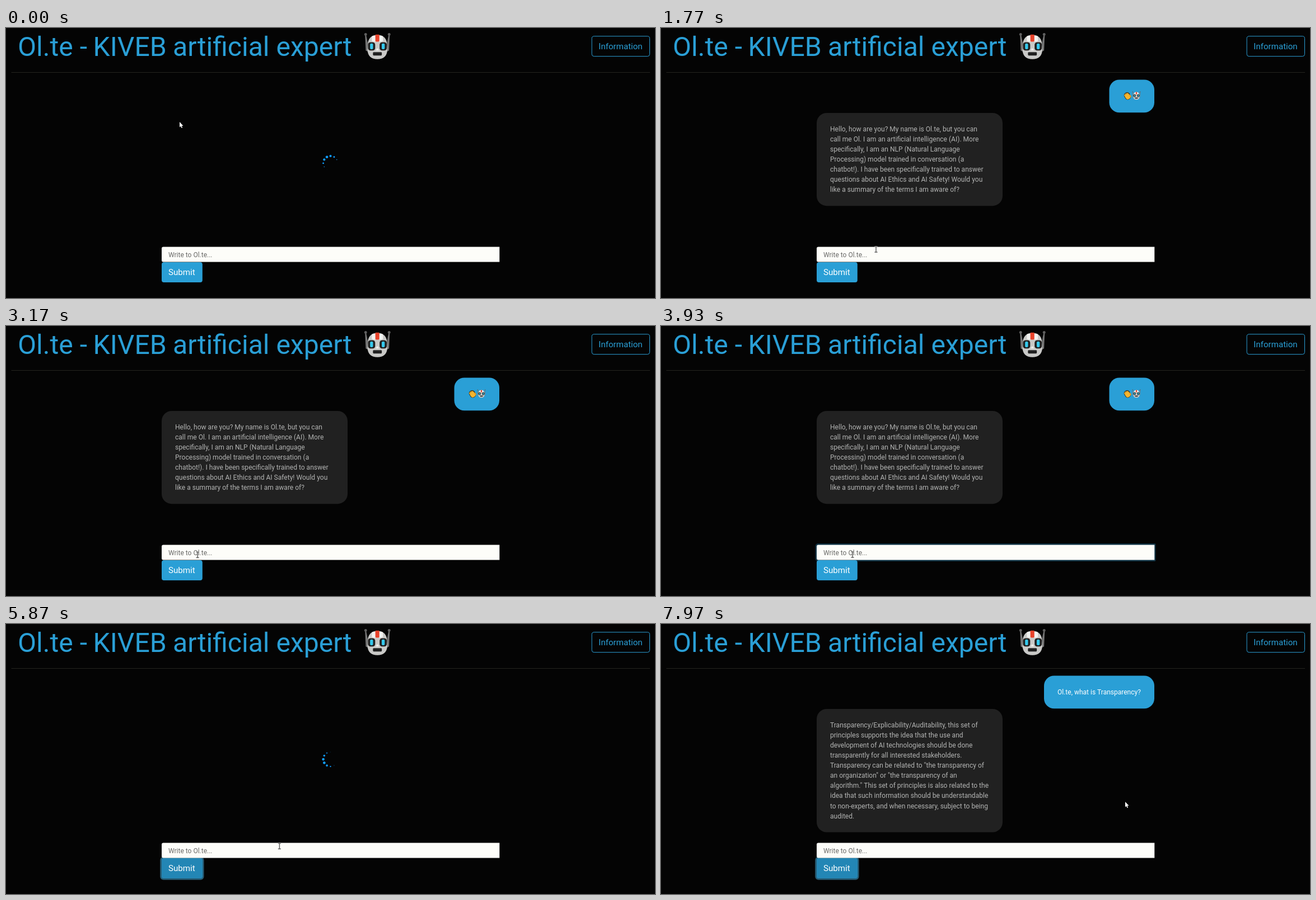
These frames come from a looping animation (1159x483 px, 8000 ms). An HTML page with a canvas:

```html
<!DOCTYPE html>
<html lang="en">
<head>
<meta charset="utf-8">
<title>Chatbot</title>
<style>
html, body { margin: 0; width: 100%; height: 100%; overflow: hidden; background: #040404; }
canvas { display: block; width: 1159px; height: 483px; }
</style>
</head>
<body>
<canvas id="stage"></canvas>
<script>
const W = 1159, H = 483, LOOP = 8000;
const BG = '#040404', BLUE = '#2a9fd6', GREY = '#212121';
const NAME = 'Ol.te';
const QUESTION = NAME + ', what is Transparency?';
const GREETING = [
  `Hello, how are you? My name is ${NAME}, but you can`,
  'call me Ol. I am an artificial intelligence (AI). More',
  'specifically, I am an NLP (Natural Language',
  'Processing) model trained in conversation (a',
  'chatbot!). I have been specifically trained to answer',
  'questions about AI Ethics and AI Safety! Would you',
  'like a summary of the terms I am aware of?'
];
const ANSWER = [
  'Transparency/Explicability/Auditability, this set of',
  'principles supports the idea that the use and',
  'development of AI technologies should be done',
  'transparently for all interested stakeholders.',
  'Transparency can be related to "the transparency of',
  'an organization" or "the transparency of an',
  'algorithm." This set of principles is also related to the',
  'idea that such information should be understandable',
  'to non-experts, and when necessary, subject to being',
  'audited.'
];

// Moments in ms
const GREET = 600, FOCUS = 3600, TYPE = 4100, TYPED = 4780;
const CLICK = 5380, LOAD = 5430, REPLY = 7400;

// Pointer stops: time, x, y
const PATH = [
  [0, 310, 168], [700, 318, 185], [1770, 384, 396], [2170, 340, 438],
  [2440, 338, 438], [2570, 345, 418], [3250, 342, 409], [4780, 342, 409],
  [5120, 322, 436], [5480, 322, 436], [6500, 829, 318], [LOOP, 829, 318]
];

const canvas = document.getElementById('stage');
const c = canvas.getContext('2d');
const dpr = window.devicePixelRatio || 1;
canvas.width = W * dpr;
canvas.height = H * dpr;

const clamp = v => Math.max(0, Math.min(1, v));
const smooth = p => p * p * (3 - 2 * p);
const ramp = (t, start, length) => clamp((t - start) / length);

function box(x, y, w, h, r, fill) {
  c.beginPath();
  c.roundRect(x, y, w, h, r);
  c.fillStyle = fill;
  c.fill();
}

function dot(x, y, r, fill) {
  c.beginPath();
  c.arc(x, y, r, 0, Math.PI * 2);
  c.fillStyle = fill;
  c.fill();
}

function poly(points, fill, stroke, width = 1) {
  c.beginPath();
  for (let i = 0; i < points.length; i += 2) c.lineTo(points[i], points[i + 1]);
  c.closePath();
  c.lineWidth = width;
  c.lineJoin = 'round';
  c.strokeStyle = stroke || fill;
  if (stroke) c.stroke();
  c.fillStyle = fill;
  c.fill();
}

function text(s, x, y, size, fill) {
  c.font = `${size}px Roboto, sans-serif`;
  c.fillStyle = fill;
  c.fillText(s, x, y);
}

// Robot face on a 48 unit square
function robot(x, y, size) {
  c.save();
  c.translate(x, y);
  c.scale(size / 48, size / 48);
  for (const side of [0, 1]) {
    c.save();
    if (side) { c.translate(48, 0); c.scale(-1, 1); }
    poly([1.8, 4, 3.8, 4, 6.5, 18, 7, 34, 3, 32], '#757575');
    dot(2.8, 2.8, 2.5, '#606060');
    c.restore();
  }
  c.beginPath();
  c.moveTo(7, 17);
  c.bezierCurveTo(9, 8, 15, 4, 24, 3.5);
  c.bezierCurveTo(33, 4, 39, 8, 41, 17);
  c.lineTo(42, 31);
  c.bezierCurveTo(41, 42, 35, 47.5, 24, 47.5);
  c.bezierCurveTo(13, 47.5, 7, 42, 6, 31);
  c.closePath();
  c.fillStyle = '#c9c9c7';
  c.fill();
  box(14, 5, 20, 11, 3, '#f2f2f0');
  box(20.3, 3, 7.2, 13, 1.5, '#e8432b');
  for (const left of [7, 28]) {
    box(left, 17, 13, 15, 4.5, '#202020');
    box(left + 3.8, 19.3, 5.4, 10.2, 2, '#35c9ee');
  }
  poly([23, 28, 25, 28, 27, 32, 21, 32], '#eeeeec');
  box(16, 35, 16, 6, 1.5, '#202020');
  c.restore();
}

function wavingHand(x, y) {
  c.save();
  c.translate(x, y);
  c.rotate(-0.55);
  box(-5.4, -6.5, 10.6, 13.2, 4.5, '#2c2112');
  box(-4.5, -3, 8.8, 9, 3.5, '#f5b62f');
  for (let i = 0; i < 4; i++) box(-4.5 + i * 2.1, -6 + Math.abs(i - 1.5) * 0.8, 1.9, 7, 0.9, '#f5b62f');
  box(3.2, 0, 2.3, 5, 1, '#e69a20');
  c.restore();
}

function bubble(lines) {
  box(278, 152, 332, 39.4 + lines.length * 18.12, 18, GREY);
  lines.forEach((s, i) => text(s, 302, 184.6 + i * 18.12, 12.05, '#b3b4b3'));
}

function asked(x) {
  box(x, 92.5, 881 - x, 58.8, 18, BLUE);
}

// Twelve dots on a ring, each growing and shrinking in turn
function spinner(t, lead) {
  for (let i = 0; i < 12; i++) {
    const phase = ((((t + lead) / 1200 - i / 12) % 1) + 1) % 1;
    const size = smooth(clamp(1 - Math.abs(phase - 0.4) / 0.4));
    const a = i * Math.PI / 6;
    if (size > 0.01) dot(579.5 + 12.9 * Math.sin(a), 241.9 - 12.9 * Math.cos(a), 2.35 * size, '#119dff');
  }
}

function header() {
  text(NAME + ' -', 21, 49.6, 48.1, BLUE);
  text('KIVEB', 155.5, 49.6, 48.1, BLUE);
  text('artificial expert', 298.1, 49.6, 48.1, BLUE);
  robot(639.5, 8.7, 47.5);
  c.strokeStyle = BLUE;
  c.lineWidth = 1;
  c.beginPath();
  c.roundRect(1046.2, 14.7, 103.3, 36, 4);
  c.stroke();
  text('Information', 1058.3, 38, 15.1, BLUE);
  c.fillStyle = '#24241f';
  c.fillRect(9.5, 79, 1140.5, 1);
}

function form(t) {
  const ring = ramp(t, FOCUS, 150) * (1 - ramp(t, CLICK, 150));
  if (ring) {
    c.globalAlpha = ring;
    box(275.5, 389, 608, 32, [5, 2, 2, 5], '#0e3142');
    c.globalAlpha = 1;
  }
  const pressed = ramp(t, CLICK, 150);
  if (pressed) {
    c.globalAlpha = pressed;
    box(275.2, 416.4, 78.3, 41.3, 6, '#265c75');
    c.globalAlpha = 1;
  }
  box(278, 391.5, 603.3, 27, [3, 0, 0, 3], '#fdfdf9');
  const count = t < LOAD ? Math.ceil(QUESTION.length * ramp(t, TYPE, TYPED - TYPE)) : 0;
  if (count) text(QUESTION.slice(0, count), 290, 409.8, 12, '#2c2c2c');
  else text(`Write to ${NAME}...`, 290, 409.8, 12, '#6a6a68');

  const hover = Math.max(ramp(t, 2080, 150) * (1 - ramp(t, 2570, 150)), ramp(t, 4880, 150));
  box(278, 419, 72.8, 36, 4, BLUE);
  c.globalAlpha = hover;
  box(278, 419, 72.8, 36, 4, '#2386b5');
  c.globalAlpha = 1;
  text('Submit', 290, 441.8, 15.15, '#fff');
}

function pointerAt(t) {
  const i = Math.max(1, PATH.findIndex(p => p[0] > t));
  const [t0, x0, y0] = PATH[i - 1], [t1, x1, y1] = PATH[i];
  const p = smooth(clamp((t - t0) / (t1 - t0)));
  return [x0 + (x1 - x0) * p, y0 + (y1 - y0) * p];
}

function ibeam(x, y) {
  const trace = (color, width) => {
    c.strokeStyle = color;
    c.lineWidth = width;
    c.beginPath();
    c.moveTo(-2.5, -5); c.lineTo(2.5, -5);
    c.moveTo(0, -5); c.lineTo(0, 5);
    c.moveTo(-2.5, 5); c.lineTo(2.5, 5);
    c.stroke();
  };
  c.translate(x, y);
  trace('#c8c8c6', 2);
  trace('#4a4a4a', 1);
}

function pointer(t) {
  const [x, y] = pointerAt(t);
  const inside = x > 278 && x < 881;
  c.save();
  if (inside && y > 391 && y < 419) {
    ibeam(x, y);
  } else if (x > 278 && x < 351 && y >= 419 && y < 455) {
    c.translate(x, y);
    poly([-1, 0, 1, 0, 1.2, 4, 5.5, 5.2, 6, 8, 4.5, 13, -1, 13, -4, 8.5, -3, 7, -1, 8], '#fff', '#222', 1.6);
  } else {
    c.translate(x, y);
    poly([0, 0, 0, 9.5, 2.1, 7.7, 3.6, 11, 5.1, 10.3, 3.7, 7.1, 6.5, 7], '#fff', '#000', 1.4);
  }
  c.restore();
}

function draw(t) {
  c.setTransform(dpr, 0, 0, dpr, 0, 0);
  c.fillStyle = BG;
  c.fillRect(0, 0, W, H);
  header();
  if (t < GREET) {
    spinner(t, 380);
  } else if (t < LOAD) {
    asked(800.5);
    wavingHand(833, 121.5);
    robot(841.5, 113.5, 15);
    bubble(GREETING);
  } else if (t < REPLY) {
    spinner(t - 6830, 1080);
  } else {
    asked(684);
    text(QUESTION, 708, 126, 12, '#fff');
    bubble(ANSWER);
  }
  form(t);
  pointer(t);
}

const start = performance.now();
function tick() {
  draw((performance.now() - start) % LOOP);
  requestAnimationFrame(tick);
}
tick();
</script>
</body>
</html>
```
